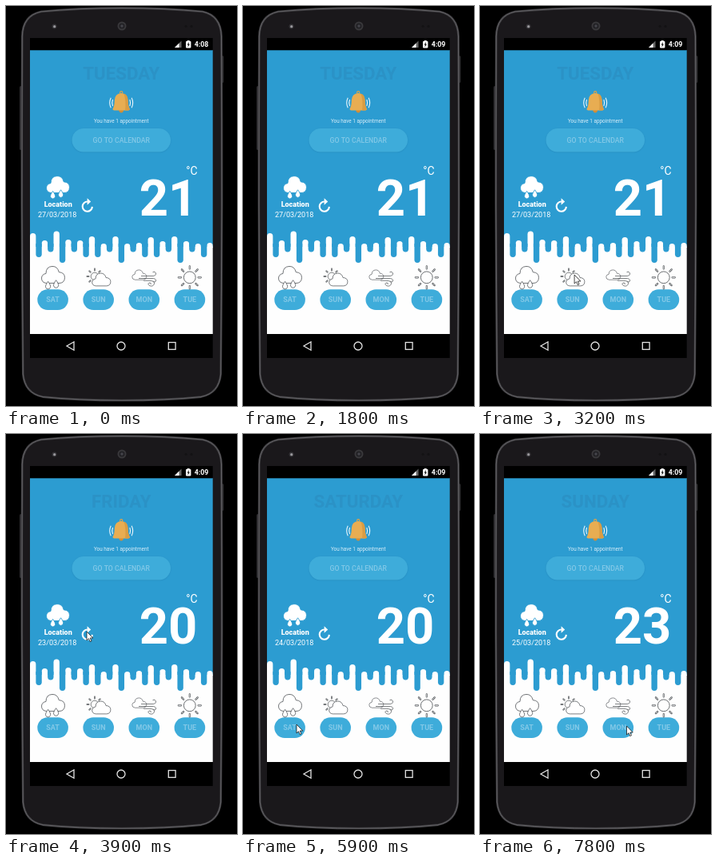
An HTML page with a canvas that plays this animation: 289 px wide and 500 px high, repeating every 8 s.

```html
<!DOCTYPE html>
<html lang="en">
<head>
<meta charset="utf-8">
<title>Weather app</title>
<style>
html, body { margin: 0; width: 100%; height: 100%; overflow: hidden; background: #000; }
canvas { display: block; width: 289px; height: 500px; }
</style>
</head>
<body>
<canvas id="stage"></canvas>
<script>
const W = 289, H = 500, LOOP = 8000;
const BLUE = '#2c9cd1', PILL = '#3eacda', LABEL = '#82c8e7', LINE = '#484c50';
const LEFT = 30, WIDE = 228.7;
const canvas = document.getElementById('stage');
const dpr = window.devicePixelRatio || 1;
canvas.width = W * dpr;
canvas.height = H * dpr;
const c = canvas.getContext('2d');

// [start time, value]
const clock = [[0, '4:08'], [1100, '4:09']];
const temps = [[0, '21'], [3500, '20'], [6700, '18'], [7700, '23']];
const days = [[0, 'TUESDAY', '27'], [3600, 'FRIDAY', '23'], [5500, 'SATURDAY', '24'], [6800, 'SUNDAY', '25']];
// [start, end, x, y]: pointer travels to x, y
const moves = [[2900, 3400, 101, 247], [4500, 5100, 67, 363], [6000, 6500, 110.2, 366], [7200, 7600, 183.5, 365]];
const entry = [150, 502];

const whiteTops = [284, 293, 281.5, 292, 293, 288, 297, 288, 297, 296, 289, 294, 288, 294, 297, 296];
const blueEnds = [314, 307.5, 321, 307.5, 314]; // repeats across the screen

const at = (list, t) => list.filter(e => e[0] <= t).pop();

function text(str, x, y, size, color, weight = 400, align = 'center') {
  c.font = `${weight} ${size}px Roboto, sans-serif`;
  c.textAlign = align;
  c.fillStyle = color;
  c.fillText(str, x, y);
}

function rect(x, y, w, h, color) {
  c.fillStyle = color;
  c.fillRect(x, y, w, h);
}

function pill(x, y, w, h, color, r = h / 2) {
  c.beginPath();
  c.roundRect(x, y, w, h, r);
  c.fillStyle = color;
  c.fill();
}

function disc(x, y, r, color) {
  c.beginPath();
  c.arc(x, y, r, 0, 7);
  c.fillStyle = color;
  c.fill();
}

function arc(x, y, r, from, to, color, width) {
  c.beginPath();
  c.arc(x, y, r, from, to);
  c.strokeStyle = color;
  c.lineWidth = width;
  c.stroke();
}

function shape(d, fill, line, width) {
  const p = new Path2D(d);
  if (fill) { c.fillStyle = fill; c.fill(p); }
  if (line) {
    c.strokeStyle = line;
    c.lineWidth = width;
    c.stroke(p);
  }
}

function place(x, y, scale, draw) {
  c.save();
  c.translate(x, y);
  c.scale(scale, scale);
  draw();
  c.restore();
}

function shadowPill(x, y, w, h) {
  c.save();
  c.shadowColor = 'rgba(0,60,100,.18)';
  c.shadowBlur = 1.5 * dpr;
  c.shadowOffsetY = dpr * .5;
  pill(x, y, w, h, PILL);
  c.restore();
}

function phone() {
  rect(0, 0, W, H, '#000');
  pill(17, 100, 5, 80, '#2f2e31', 1.5);
  pill(268, 62, 4.2, 34, '#343336', 1.5);
  const body = 'M20.3 38Q20.8 12 44 7Q90 2.6 145 2.6Q200 2.6 246 7Q268.7 12 269.5 38' +
    'Q271 247 268.7 460Q266.5 484 244 488.6Q200 493 145 493Q90 493 46 488.6Q23.5 484 21.3 460Q19 247 20.3 38Z';
  shape(body, '#1a181b', '#3c3b3e', 2.6);
  shape(body, null, '#626165', 1);
  disc(145, 25, 5.5, '#39383b');
  disc(145, 25, 3.6, '#222125');
  disc(145, 25, 1.7, '#45454b');
  disc(60.5, 25.5, 3, '#343337');
  disc(60.7, 25.7, 1.6, '#9a999d');
  disc(225, 25.3, 1.5, '#131214');
  disc(232, 25.3, 1.5, '#131214');
}

function bars(t) {
  rect(LEFT, 40, WIDE, 15.3, '#000');
  shape('M211 52L219.5 43.5V52Z', '#666');
  shape('M211 52L216.5 46.5V52Z', '#fff');
  rect(226.7, 43, 3, 2, '#fff');
  pill(225, 44, 6.4, 8.4, '#fff', .8);
  shape('M229 45L226.6 48.6H228L227.4 51.4L229.9 47.7H228.5Z', '#000');
  text(at(clock, t)[1], 253.3, 51.3, 8.8, '#fff', 700, 'right');

  rect(LEFT, 410, WIDE, 30, '#000');
  shape('M85 419.8V430.2L76 425Z', null, '#e4e4e4', 1.3);
  arc(144, 425, 5, 0, 7, '#e4e4e4', 1.3);
  c.strokeRect(203.3, 420.5, 8.8, 8.8);
}

function drips() {
  const w = WIDE / 31, r = w / 2;
  rect(LEFT, 55, WIDE, 247, BLUE);
  rect(LEFT, 301, WIDE, 109, '#fefefe');
  whiteTops.forEach((y, i) => pill(LEFT + 2 * i * w, y, w, 302 - y, '#fefefe', [r, r, 0, 0]));
  for (let i = 0; i < 15; i++)
    pill(LEFT + (2 * i + 1) * w, 297, w, blueEnds[i % 5] - 297, BLUE, [0, 0, r, r]);
}

const CLOUD = 'M6.5 20.5Q.5 20 .5 14.5Q.8 10 6 9.2Q6 1 14 .7Q20.5 .6 22.2 7.5Q29.4 8 29.5 14Q29.2 20.3 23 20.5Z';
const DROP = 'M0 0Q3.6 4.8 3 7.2Q2.2 9.6 0 9.6Q-2.2 9.6 -3 7.2Q-3.6 4.8 0 0Z';

function rainCloud(x, y, line, width) {
  place(x, y, 1, () => {
    c.scale(1, 1.06);
    shape(CLOUD, '#fff', line, width);
  });
  for (const [dx, dy] of [[8.6, 19.6], [18.6, 18]])
    place(x + dx, y + dy, 1, () => shape(DROP, '#fff', line, width));
}

// hollow capsules around a sun
function rays(x, y, r1, r2, from, to, n, width) {
  c.beginPath();
  for (let i = 0; i < n; i++) {
    const a = (from + (to - from) * i / n) * Math.PI / 180;
    c.moveTo(x + r1 * Math.cos(a), y + r1 * Math.sin(a));
    c.lineTo(x + r2 * Math.cos(a), y + r2 * Math.sin(a));
  }
  c.lineCap = 'round';
  for (const [color, w] of [[LINE, width], ['#fff', width - 1.3]]) {
    c.strokeStyle = color;
    c.lineWidth = w;
    c.stroke();
  }
  c.lineCap = 'butt';
}

function forecastIcons() {
  rainCloud(44, 324.7, LINE, .75);

  arc(111, 338, 4.8, 0, 7, LINE, .7);
  rays(111, 338, 7.5, 9.5, 135, 360, 5, 1.8);
  place(107.3, 333.5, .8, () => shape(CLOUD, '#fff', LINE, .9));

  place(157.5, 329.5, .62, () => shape(CLOUD, '#fff', LINE, 1));
  for (const d of ['M169 337.5H184Q188 337 187.5 334Q186.5 331 183.5 332.7',
    'M166 340.5H184.5Q189 341.5 187 344.6Q184.5 346 184 343.7',
    'M172 343.3H180Q186 343.8 185.5 347.3Q184 351.3 179.5 349.6Q176.5 347.5 179 346Q182 345.6 181.3 348'])
    shape(d, null, LINE, .7);

  arc(229.8, 339.3, 7.4, 0, 7, LINE, .8);
  rays(229.8, 339.3, 10.8, 14, 0, 360, 8, 2.2);
}

function bell() {
  arc(144.2, 108.3, 1.6, 0, 7, '#e0a347', 1.2);
  disc(144.2, 130.6, 2.8, '#d08d38');
  shape('M144.2 109Q152.3 109.5 152.6 118Q152.6 125.5 155 128.8Q154.8 130.6 153 130.6H135.4Q133.6 130.6 133.4 128.8Q135.8 125.5 135.8 118Q136.1 109.5 144.2 109Z', '#e8ad52');
  shape('M147.5 109.6Q152.3 111 152.6 118Q152.6 125.5 155 128.8Q154.8 130.6 153 130.6H149Q150.5 119 147.5 109.6Z', '#d99c43');
  for (const mid of [0, Math.PI])
    for (const [r, spread] of [[11.4, .36], [14.4, .45]])
      arc(144.2, 121, r, mid - spread, mid + spread, '#eaf5fb', 1.1);
}

function refresh() {
  arc(101.8, 250.6, 6.1, .05, Math.PI * 1.5, '#fff', 2.1);
  shape('M101.6 240.2L106.2 244.5L101.6 248.8Z', '#fff');
}

function pointer(t) {
  if (t < moves[0][0]) return;
  let [x, y] = entry;
  for (const [start, end, tx, ty] of moves) {
    const k = Math.min(1, Math.max(0, (t - start) / (end - start)));
    const e = k * k * (3 - 2 * k);
    x += (tx - x) * e;
    y += (ty - y) * e;
  }
  place(x, y, 1, () => shape('M0 0V11L2.5 8.7L4.2 12.6L6 11.8L4.3 8H7.8Z', '#fff', '#1a1a1a', .8));
}

function draw(t) {
  c.setTransform(dpr, 0, 0, dpr, 0, 0);
  phone();
  drips();
  bars(t);

  const [, day, date] = at(days, t);
  text(day, 144.3, 92, 22.3, '#2b92c6', 700);
  bell();
  text('You have 1 appointment', 144.2, 146.2, 6.4, '#d9eef8');
  shadowPill(82.5, 153, 123.5, 29.5);
  text('GO TO CALENDAR', 144.3, 171.2, 8.7, LABEL, 500);

  rainCloud(50, 211.8, BLUE, .9);
  text('Location', 65.2, 251.4, 9, '#fff', 900);
  text(`${date}/03/2018`, 64.2, 263.5, 9.1, '#fff');
  refresh();
  text('°C', 239.7, 211, 14, '#fff', 400, 'right');
  text(at(temps, t)[1], 203, 261.6, 63.3, '#fff', 700);

  ['SAT', 'SUN', 'MON', 'TUE'].forEach((name, i) => {
    const x = 58.6 + 57.1 * i;
    pill(x - 19.3, 354.2, 38.6, 25.8, PILL);
    text(name, x, 370.2, 9, LABEL, 700);
  });
  forecastIcons();
  pointer(t);
}

const begin = performance.now();
function tick() {
  draw((performance.now() - begin) % LOOP);
  requestAnimationFrame(tick);
}
tick();
</script>
</body>
</html>
```
